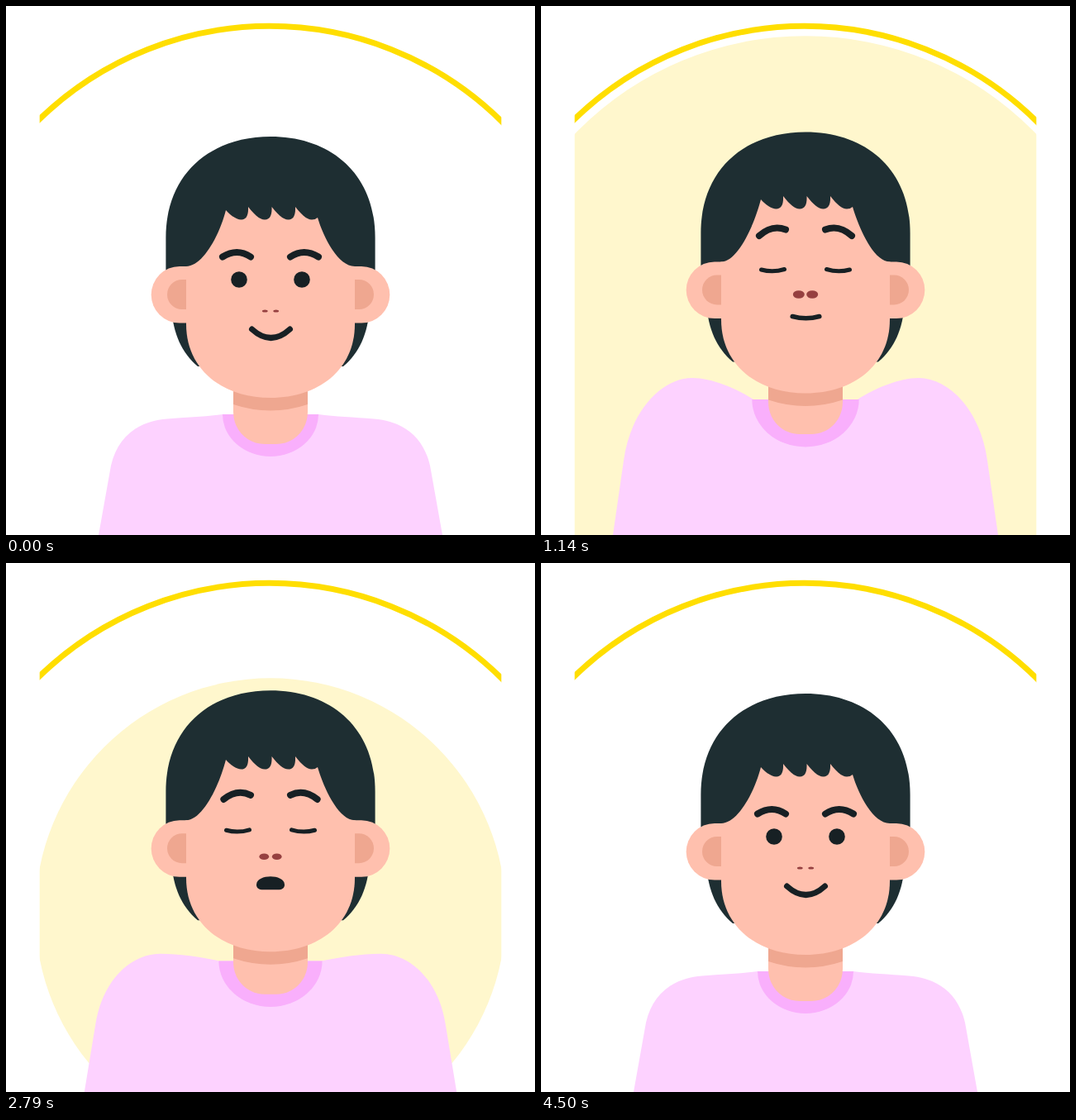
These frames come from a looping animation (640x640 px, 4.78 s). An HTML page:

```html
<!DOCTYPE html>
<html lang="en">
<head>
<meta charset="utf-8">
<title>Breathing exercise</title>
<style>
  html, body { margin: 0; width: 100%; height: 100%; overflow: hidden; background: #fff; }
  svg { display: block; width: 100%; height: 100%; }
  .skin { fill: #ffc0ae; }
  .shade { fill: #efa790; }
  .hair { fill: #1e2e32; }
  .ink { fill: #172024; }
  .line { fill: none; stroke: #172024; stroke-linecap: round; }
</style>
</head>
<body>
<svg viewBox="0 0 640 640">
  <defs>
    <clipPath id="window"><rect x="40.7" y="0" width="558.6" height="640"/></clipPath>
    <g id="ear">
      <path class="skin" d="M222 315H210a34.3 34.3 0 0 0 0 68.6H222Z"/>
      <path class="shade" d="M218 331H213a18 18 0 0 0 0 36H218Z"/>
    </g>
    <path id="lid" class="line" stroke-width="5" d="M266.5 336.5Q280.5 340.4 294.5 336"/>
  </defs>
  <g clip-path="url(#window)">
    <circle cx="318.7" cy="424.3" r="400" fill="none" stroke="#ffde00" stroke-width="7"/>
    <circle id="glow" cx="320" cy="424" fill="#fff7cd"/>
  </g>
  <path id="body" fill="#fdd2ff"/>
  <path id="collar" fill="#f9affc"/>
  <path id="neck" class="skin"/>
  <g id="head">
    <path class="shade" d="M275 440H365V482Q320 497 275 482Z"/>
    <path class="hair" d="M200.5 365C201.5 396 213 420 232 436H408C427 420 438.5 396 439.5 365Z"/>
    <path class="skin" d="M218 230V385C218 440 262 474 320 474C378 474 422 440 422 385V230Z"/>
    <path id="hair" class="hair"/>
    <use href="#ear"/>
    <use href="#ear" transform="matrix(-1 0 0 1 640 0)"/>
  </g>
  <path id="brows" class="line" stroke-width="8"/>
  <g id="openEyes" class="ink">
    <ellipse cx="282" rx="9.8"/>
    <ellipse cx="358" rx="9.8"/>
  </g>
  <g id="shutEyes">
    <use href="#lid"/>
    <use href="#lid" transform="matrix(-1 0 0 1 640 0)"/>
  </g>
  <g id="nose" fill="#964040"><ellipse/><ellipse/></g>
  <path id="lips" class="line"/>
  <path id="openMouth" class="ink"
    d="M-17 2C-17-5-8-8 0-8S17-5 17 2C17 6 14 8 9 8H-9C-14 8-17 6-17 2Z"/>
</svg>
<script>
const LOOP = 4780, STEP = 1000 / 14, LAST = 63;
const INHALED = 1140, EXHALE = 2430, EMPTY = EXHALE + INHALED;

const $ = id => document.getElementById(id);
const set = (el, attrs) => { for (const k in attrs) el.setAttribute(k, attrs[k]); };
const show = (el, on) => set(el, { visibility: on ? 'visible' : 'hidden' });
const mix = (a, b, k) => a + (b - a) * k;
const ramp = (t, from, to) => Math.min(1, Math.max(0, (t - from) / (to - from)));

// Mirrored shirt outline; shoulders rise with the breath and sag on the way out
function shirtPath(k, sag) {
  const ax = 127 - 27 * k, ay = 556 - 6 * k + 0.75 * sag;
  const sx = 195 - 12 * k, sy = 499.5 - 49.5 * k + sag;
  const nx = 262 - 5 * k, ny = 494 - 18 * k;
  const slope = Math.min(0, (ny - sy) / (nx - sx));
  const left = [
    [112 - 25 * k, 640], [ax, ay],
    [ax + 8, mix(ay, sy, 0.6)], [sx - 37, sy - 37 * slope], [sx, sy],
    [sx + 24, sy + 24 * slope], [nx - 20, mix(ny, sy, 0.5)], [nx, ny]
  ];
  const right = left.map(([x, y]) => [640 - x, y]).reverse();
  const curve = pts => 'C' + pts.join(' ');
  return `M${left[0]}L${left[1]}${curve(left.slice(2))}` +
    `L${right[0]}${curve(right.slice(1, 7))}L${right[7]}Z`;
}

// The fringe slides up relative to the dome as the head tips back
function hairPath(lift) {
  const y = v => v - lift;
  const dip = 'c8 10 14 15.5 20 15.5', tip = 'c6.5 0 9-5.5 8.5-15.5';
  return `M218 315C238 315 258 ${y(278)} 266 ${y(247)}c5 6 13 11.5 18.5 11.5${tip}` +
    (dip + tip).repeat(2) + dip + `q4 0 7-2.5C384 ${y(280)} 402 315 422 315` +
    'L446.6 326V280C446.6 204 394 158 320 158S193.4 204 193.4 280V326Z';
}

function browPath(k) {
  const outerX = 262 + 2 * k, outerY = 303.5 - 25.5 * k, innerY = 303.5 - 33 * k, arch = 292.5 - 28.5 * k;
  return `M${outerX} ${outerY}Q279.5 ${arch} 296 ${innerY}M${640 - outerX} ${outerY}Q360.5 ${arch} 344 ${innerY}`;
}

function drawTorso(t, k) {
  const sag = 13 * (ramp(t, EXHALE, 3070) - ramp(t, 3710, 4000));
  set($('body'), { d: shirtPath(k, sag) });
  const w = 58 + 6.7 * k, top = 494 - 18 * k;
  set($('collar'), { d: `M${320 - w} ${top}a${w} ${51 + 6.5 * k} 0 0 0 ${2 * w} 0Z` });
  set($('neck'), { d: `M275 440V${491 - 12 * k}c0 22 17 39 38 39h14c21 0 38-17 38-39V440Z` });
}

function drawEyes(t, k) {
  const easing = t < EXHALE ? 2.6 : 0.75;
  const y = -17.5 * k ** easing;
  const open = 1 - ramp(t, 0, 260) + ramp(t, 1360, 1560) - ramp(t, 2405, 2640) + ramp(t, 3750, 3960);
  const shut = open < 0.22;
  show($('openEyes'), !shut);
  show($('shutEyes'), shut);
  for (const eye of $('openEyes').children) set(eye, { cy: 331 + y + 5 * (1 - open), ry: 9.8 * open });
  set($('shutEyes'), { transform: `translate(0 ${y})` });
}

function drawMouth(t, k) {
  const speaking = t >= EXHALE - STEP && t < 4000;
  show($('lips'), !speaking);
  show($('openMouth'), speaking);

  const smile = 1 - ramp(t, 0, 400) + ramp(t, 4000, 4500);
  const half = mix(16.3, 23, smile), y = mix(395, 391, smile) - 19.5 * k;
  set($('lips'), {
    'stroke-width': mix(5.5, 7, smile),
    d: `M${320.5 - half} ${y}q${half} ${mix(4.6, 21, smile)} ${2 * half} 0`
  });

  const gape = ramp(t, EXHALE, 2680) - ramp(t, 3200, EMPTY);
  set($('openMouth'), {
    transform: `translate(320 ${396.3 - 19 * k + 4 * gape}) scale(1 ${mix(0.34, 1, gape)})`
  });
}

function draw(t) {
  const fill = Math.min(t, EMPTY - t) / INHALED;
  const k = ramp(fill, 0, 1);
  set($('glow'), { r: Math.min(404.5, 59 + 328 * Math.max(0, fill)) });
  drawTorso(t, k);

  const nod = -7.8 * ramp(t, 0, 500) + 2.2 * ramp(t, 640, INHALED) + 5.6 * ramp(t, EXHALE, EMPTY);
  set($('head'), { transform: `translate(0 ${nod})` });
  set($('hair'), { d: hairPath(7.4 * k) });
  set($('brows'), { d: browPath(k) });
  [-1, 1].forEach((side, i) => set($('nose').children[i], {
    cx: 320 + side * (6.7 + 1.5 * k), cy: 369 - 20 * k, rx: 3.4 + 3.6 * k, ry: 1.6 + 3.2 * k
  }));
  drawEyes(t, k);
  drawMouth(t, k);
}

function tick() {
  const step = Math.min(LAST, Math.floor((performance.now() % LOOP + 5) / STEP));
  draw(step * STEP);
  requestAnimationFrame(tick);
}
tick();
</script>
</body>
</html>
```
